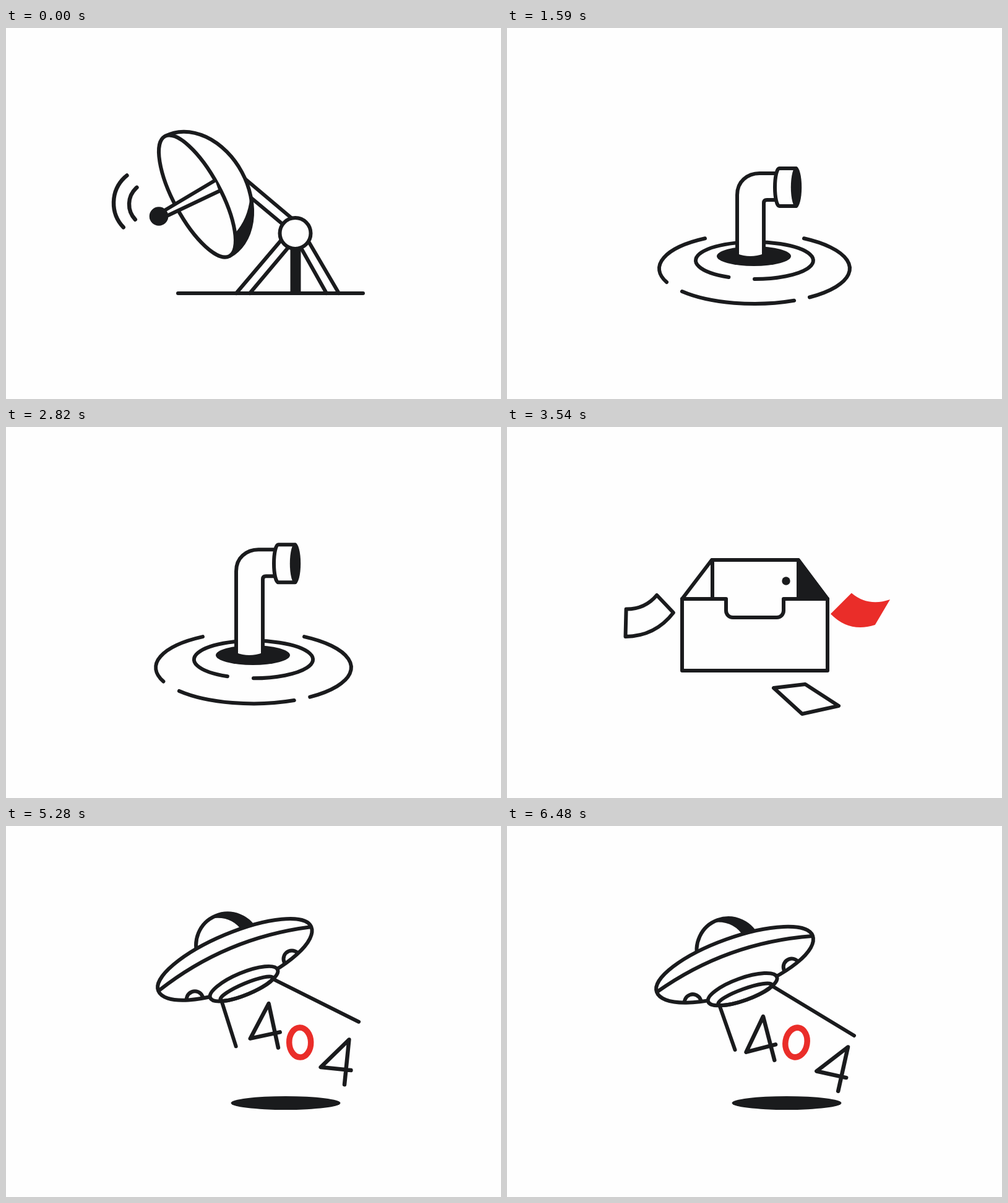
Animation of 800x600 px, one loop 6540 ms. Source, as an HTML page with a canvas:

```html
<!DOCTYPE html>
<html lang="en">
<head>
<meta charset="utf-8">
<title>Dish, periscope, drawer, saucer</title>
<style>
  html, body { margin: 0; width: 100%; height: 100%; overflow: hidden; background: #fefefe; }
  canvas { display: block; width: 800px; height: 600px; }
</style>
</head>
<body>
<canvas id="stage" width="800" height="600"></canvas>
<script>
const ctx = document.getElementById('stage').getContext('2d');
const INK = '#1a1b1d', RED = '#ea2d29', PAPER = '#fefefe';
const LOOP = 6540, TAU = Math.PI * 2;

const rad = d => d * Math.PI / 180;
const mix = (a, b, k) => a + (b - a) * k;
const clamp01 = v => Math.min(1, Math.max(0, v));
const ease = v => (1 - Math.cos(Math.PI * clamp01(v))) / 2;
const hump = v => Math.sin(Math.PI * v) ** 2;

function shape(trace, { fill, stroke = INK, width = 6 } = {}) {
  ctx.beginPath();
  trace(ctx);
  if (fill) { ctx.fillStyle = fill; ctx.fill(); }
  if (stroke) { ctx.strokeStyle = stroke; ctx.lineWidth = width; ctx.stroke(); }
}

function poly(points, style, close = false) {
  shape(c => {
    points.forEach(([x, y]) => c.lineTo(x, y));
    if (close) c.closePath();
  }, style);
}

function oval(x, y, rx, ry, style, from = 0, to = 360) {
  shape(c => c.ellipse(x, y, rx, ry, 0, rad(from), rad(to)), style);
}

function at(x, y, degrees, draw) {
  ctx.save();
  ctx.translate(x, y);
  ctx.rotate(rad(degrees));
  draw();
  ctx.restore();
}

const SOLID = { fill: INK, stroke: null };
const WHITE = { fill: PAPER };

// --- Satellite dish ---

function dishHead() {
  poly([[385, 243], [461, 307], [448, 318], [388, 267]], { fill: PAPER, stroke: null });
  poly([[384, 242], [461, 307]]);
  poly([[393, 272], [448, 318]]);

  at(309, 272, -28.3, () => {
    shape(c => c.ellipse(0, 0, 82, 110, 0, -Math.PI / 2, Math.PI / 2), WHITE);
    shape(c => {
      c.moveTo(75, 44);
      c.quadraticCurveTo(55, 73, 26, 83);
      c.ellipse(0, 0, 38, 110, 0, .855, Math.PI / 2);
      c.ellipse(0, 0, 82, 110, 0, Math.PI / 2, .41, true);
    }, { fill: INK, width: 3 });
    oval(0, 0, 38, 110, WHITE);
  });

  poly([[258, 294], [338, 247], [344, 264], [262, 303]], { fill: PAPER, stroke: null });
  poly([[258, 294], [337, 247]]);
  poly([[262, 303], [344, 264]]);
  oval(247, 304.5, 15.3, 15.3, SOLID);
  oval(231, 283, 57, 57, { width: 6.5 }, 136.4, 231.3);
  oval(235, 285, 36, 36, { width: 6.5 }, 136.7, 229);
}

function dishScene(t) {
  const angle = -10.5 * (t < 450 ? ease(t / 450) : 1 - ease((t - 450) / 990));
  at(468, 332, angle, () => {
    ctx.translate(-468, -332);
    dishHead();
  });
  poly([[444, 344], [372, 429]]);
  poly([[457, 354], [394, 429]]);
  poly([[490, 347], [538, 429]]);
  poly([[477, 356], [518, 429]]);
  shape(c => c.rect(459.5, 350, 17, 79), SOLID);
  poly([[278, 429], [577, 429]]);
  oval(467.5, 332, 25, 25, WHITE);
}

// --- Periscope ---

function periscopeScene(t) {
  const ripple = hump(t / 1410);
  const lift = 74 * (t < 900 ? ease(t / 600) : 1 - ease((t - 900) / 660));
  const rx = mix(154, 180, ripple), ry = mix(57, 66, ripple);
  const grow = mix(1, 1.08, ripple);

  oval(400, 389, rx, ry, {}, 157.2, 238.7);
  oval(400, 389, rx, ry, {}, 65.4, 139.5);
  oval(400, 389, rx, ry, {}, -58.7, 54.7);
  oval(400, 376, 95 * grow, 30 * grow, {}, 116, 450);
  oval(399, 369, 60, 16, SOLID);

  const y = v => v - lift;
  shape(c => {
    c.moveTo(372, 365);
    c.lineTo(372, y(270));
    c.quadraticCurveTo(372, y(254), 382.5, y(244.5));
    c.quadraticCurveTo(393, y(235), 408, y(235));
    c.lineTo(434, y(235));
    c.lineTo(434, y(278));
    c.lineTo(420, y(278));
    c.quadraticCurveTo(415, y(278), 415, y(283));
    c.lineTo(415, 365);
    c.quadraticCurveTo(393, 373, 372, 365);
  }, { fill: PAPER, stroke: null });
  shape(c => {
    c.moveTo(372, 366);
    c.lineTo(372, y(270));
    c.quadraticCurveTo(372, y(254), 382.5, y(244.5));
    c.quadraticCurveTo(393, y(235), 408, y(235));
    c.lineTo(434, y(235));
    c.moveTo(434, y(278));
    c.lineTo(420, y(278));
    c.quadraticCurveTo(415, y(278), 415, y(283));
    c.lineTo(415, 366);
  });
  shape(c => {
    c.moveTo(467, y(227));
    c.lineTo(440, y(227));
    c.ellipse(440, y(257.5), 7, 30.5, 0, -Math.PI / 2, Math.PI / 2, true);
    c.lineTo(467, y(288));
  }, WHITE);
  oval(467.5, y(257.5), 8.7, 33.3, SOLID);
}

// --- Drawer with falling sheets ---

function sheet(half, left, right, sagTop, sagBottom, style) {
  shape(c => {
    c.moveTo(-half, 0);
    c.lineTo(...left);
    c.quadraticCurveTo((left[0] + right[0]) / 2, (left[1] + right[1]) / 2 + sagTop, ...right);
    c.lineTo(half, 0);
    c.quadraticCurveTo(0, sagBottom, -half, 0);
    c.closePath();
  }, style);
}

function drawer() {
  poly([[331, 215], [470, 215], [470, 278], [331, 278]], { fill: PAPER, stroke: null }, true);
  poly([[283, 278], [331, 215], [470, 215], [518, 278]]);
  poly([[332, 215], [332, 278]]);
  poly([[471, 215], [518, 278], [471, 278]], { fill: INK }, true);
  oval(451, 249, 6.7, 6.7, SOLID);
  shape(c => {
    c.moveTo(283, 278);
    c.lineTo(354, 278);
    c.arcTo(354, 308, 366, 308, 11);
    c.arcTo(447, 308, 447, 296, 11);
    c.lineTo(447, 278);
    c.lineTo(518, 278);
    c.lineTo(518, 394);
    c.lineTo(283, 394);
    c.closePath();
  }, WHITE);
}

function drawerScene(t) {
  drawer();

  const landing = Math.min(0, (t - 490) * .16);
  poly([[431, 422], [482, 416], [536, 451], [477, 464]].map(([x, y]) => [x, y + landing]), WHITE, true);

  const swing = -Math.cos(TAU * (t - 690) / 660);
  at(259 + 34 * swing, Math.min(441, 319.5 + (t - 630) * .1167), -17.5 + 10.7 * swing, () =>
    sheet(43.3, [-22.5, -39.2], [32, -37.3], 13, 21, WHITE));

  const settled = Math.min(t, 1320);
  const x = 553 + 25 * Math.cos(TAU * (settled - 350) / 1326);
  const y = settled < 630 ? mix(222, 311, settled / 630) : mix(311, 431, (settled - 630) / 690);
  at(x, y, 20.6 - .9 * (x - 551.5), () =>
    sheet(37, [-12.4, -41], [50.6, -45.8], 18, 23, { fill: RED, stroke: null }));
}

// --- Saucer ---

function saucerHull(c) {
  c.ellipse(0, 0, 134, 42, 0, Math.PI, TAU);
  c.ellipse(0, 0, 134, 46, 0, 0, Math.PI);
  c.closePath();
}

function saucer() {
  oval(-2, -25, 51, 51, WHITE);
  shape(c => {
    c.moveTo(-5, -75);
    c.quadraticCurveTo(24, -66, 30, -37);
    c.lineTo(50, -35);
    c.arc(-2, -25, 51, -.2, rad(-93), true);
  }, { fill: INK, width: 3 });
  shape(saucerHull, WHITE);
  ctx.save();
  ctx.beginPath();
  saucerHull(ctx);
  ctx.clip();
  for (const side of [-85, 85]) oval(side, 36, 13.5, 13.5);
  ctx.restore();
  shape(c => {
    c.moveTo(-133, 0);
    c.quadraticCurveTo(0, -37, 133, 0);
  });
  oval(-2, 43, 59, 18, WHITE);
  oval(-1, 52, 46, 9);
}

function four(x, y, angle) {
  at(x, y, angle, () => poly([[0, 73], [0, 0], [-41, 49], [8, 49]], { width: 6.5 }));
}

function speedMarks() {
  shape(c => {
    c.moveTo(282, 179);
    c.quadraticCurveTo(296, 153, 317, 140);
  });
  at(262, 186, -5, () => {
    poly([[-9.5, 0], [9.5, 0]]);
    poly([[0, -9.5], [0, 9.5]]);
  });
}

function saucerScene(t) {
  const w = .425 - .575 * Math.cos(TAU * (t - 1140) / 960);
  const go = (a, b) => mix(a, b, w);

  oval(452, 448, 88.5, 11, SOLID);
  poly([[go(352, 343), go(277, 289)], [go(374, 368.5), go(352, 362)]]);
  poly([[go(434, 429), go(239, 259)], [go(577, 561), go(300, 339)]]);
  at(go(371, 368), go(208.5, 223), go(-25, -19.8), saucer);
  if (w < .3) speedMarks();

  four(go(432.5, 414), go(271.5, 308), go(-10.4, -14.5));
  four(go(557, 551), go(336.5, 357.5), go(.8, 12.5));
  at(go(481, 467.5), 350, go(-9, 9), () => oval(0, 0, 17.5, 24, { stroke: RED, width: 9.5 }));
}

// --- Timeline ---

const SCENES = [
  [4860, saucerScene],
  [2910, drawerScene],
  [1590, periscopeScene],
  [0, dishScene],
];

function frame() {
  const t = performance.now() % LOOP;
  ctx.fillStyle = PAPER;
  ctx.fillRect(0, 0, 800, 600);
  ctx.lineCap = ctx.lineJoin = 'round';
  const [start, scene] = SCENES.find(([from]) => t >= from);
  scene(t - start);
  requestAnimationFrame(frame);
}
frame();
</script>
</body>
</html>
```
